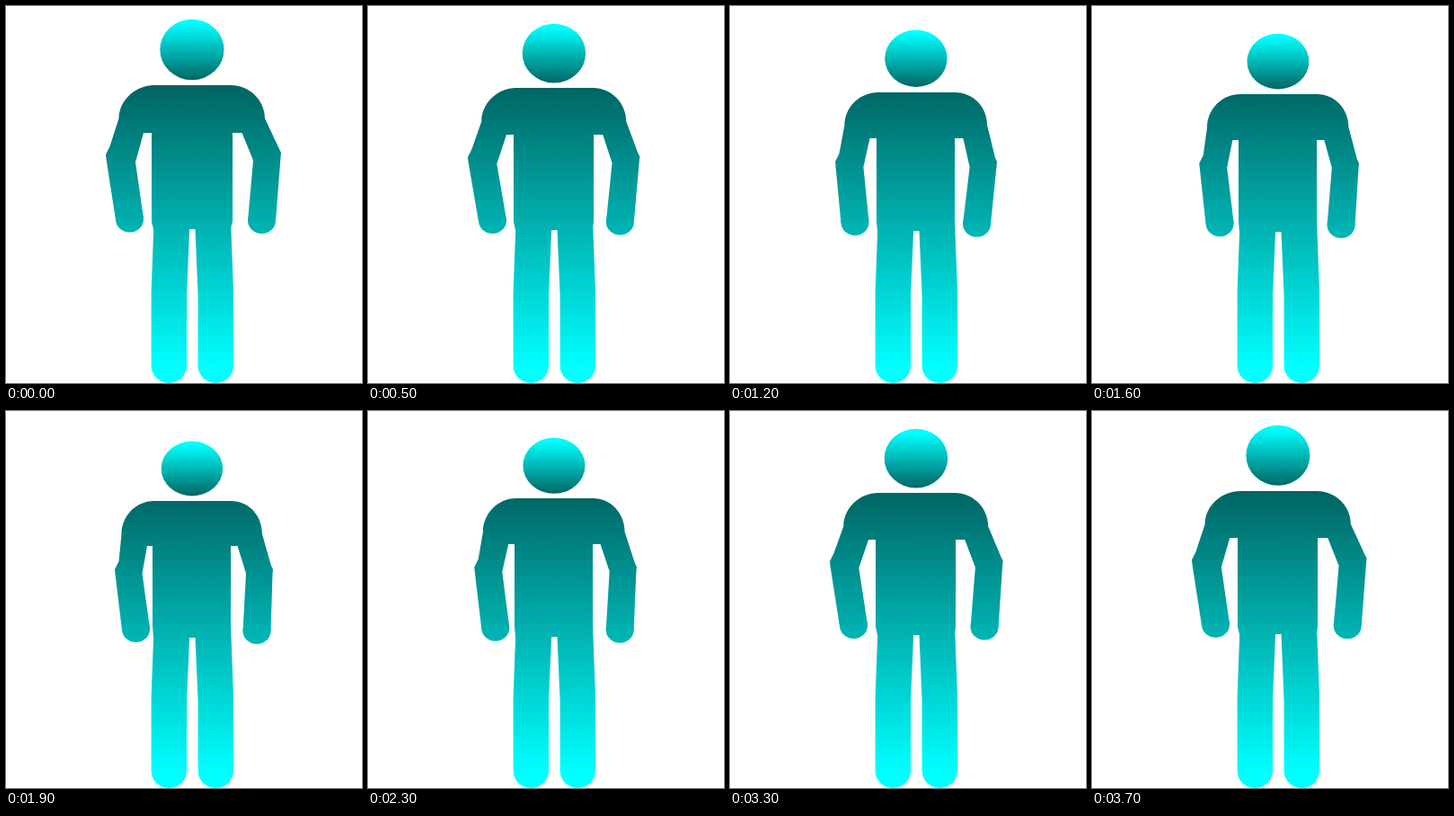
An HTML page with a canvas that plays this animation: 396 by 419 pixels, repeating every 3.8 s.

```html
<!DOCTYPE html>
<html lang="en">
<head>
<meta charset="utf-8">
<title>Breathing figure</title>
<style>
  html, body { margin: 0; width: 100%; height: 100%; overflow: hidden; background: #fff; }
  canvas { display: block; }
</style>
</head>
<body>
<canvas id="stage" width="396" height="419"></canvas>
<script>
const ctx = document.getElementById('stage').getContext('2d');
const STEP = 100, COUNT = 38, HALF = COUNT / 2;
const DARK = 'rgb(0,102,100)', CYAN = 'rgb(0,255,255)';

// Rows: step, elbow x, elbow y, hand x
const LEFT = [
  [0, 111, 165, 137.5], [5, 111, 168, 138.5], [12, 117, 173, 139],
  [19, 121, 176, 144.5], [27, 115.5, 171, 139], [33, 111, 167, 137.5], [38, 111, 165, 137.5]
];
const RIGHT = [
  [0, 306, 163, 284.5], [12, 297, 173, 274.5], [19, 297, 176, 279], [38, 306, 163, 284.5]
];

const mix = (a, b, k) => a + (b - a) * k;
const snap = (a, b, k) => Math.round(mix(a, b, k));

function pose(keys, n) {
  const i = keys.findIndex(k => k[0] > n);
  const a = keys[i - 1], b = keys[i];
  const k = (n - a[0]) / (b[0] - a[0]);
  return a.slice(1).map((v, j) => mix(v, b[j + 1], k));
}

function ramp(top, bottom, from, to) {
  const g = ctx.createLinearGradient(0, top, 0, bottom);
  g.addColorStop(0, from);
  g.addColorStop(1, to);
  return g;
}

function poly(points) {
  ctx.beginPath();
  points.forEach(p => ctx.lineTo(p[0], p[1]));
  ctx.fill();
}

function head(u) {
  const y = mix(48.5, 64, u), ry = mix(33.7, 30.4, u);
  ctx.fillStyle = ramp(y - ry + 4, y + ry, CYAN, DARK);
  ctx.beginPath();
  ctx.ellipse(206.9, y, mix(35.6, 34.2, u), ry, 0, 0, Math.PI * 2);
  ctx.fill();
}

// Points shared by the torso and the arms
function joints(u) {
  return {
    top: snap(88, 100, u), low: mix(125, 137, u), pit: snap(141, 150, u),
    l: mix(125.5, 128.5, u), r: mix(288, 285, u),
    pitL: mix(153, 157, u), pitR: mix(262.5, 257.5, u)
  };
}

function torso(u, { top, low, pit, l, r, pitL, pitR }) {
  const tl = snap(162, 163, u), tr = snap(251.6, 249.6, u), crotch = snap(248, 251.5, u);
  ctx.beginPath();
  ctx.moveTo(165, top);
  ctx.lineTo(250, top);
  ctx.bezierCurveTo(271, top, r, low - 20, r, low);
  ctx.lineTo(pitR, pit);
  ctx.lineTo(tr, pit);
  ctx.lineTo(tr, 240);
  ctx.lineTo(249.5, crotch);
  ctx.lineTo(164, crotch);
  ctx.lineTo(tl, 240);
  ctx.lineTo(tl, pit);
  ctx.lineTo(pitL, pit);
  ctx.lineTo(l, low);
  ctx.bezierCurveTo(l, low - 20, 144, top, 165, top);
  ctx.fill();
}

function arm(side, u, [ex, ey, hx], shoulder, pit, hy) {
  const ix = ex - side * mix(33, 30.5, u) + (side > 0 ? 2 - 1.5 * u : 0);
  const iy = ey + mix(8.5, 4.5, u);
  const knob = side < 0 ? [ex + 4.5, ey - 9] : [ex - 2, ey - 4];
  const tilt = side < 0 ? 1 : 0;
  poly([
    shoulder, knob, [ex, ey], [ex - side * 0.5, ey + 5],
    [hx + side * 15.5, hy + tilt], [hx - side * 15.5, hy - tilt],
    [ix, iy], pit, [207, pit[1]], [207, shoulder[1]]
  ]);
  ctx.beginPath();
  ctx.ellipse(hx, hy, 15.5, 14.5, 0, 0, Math.PI * 2);
  ctx.fill();
}

function leg(side, u) {
  const x = v => 207.3 + side * v;
  ctx.beginPath();
  ctx.moveTo(x(3.2), snap(248, 251.5, u));
  ctx.lineTo(x(6.3), 322);
  ctx.lineTo(x(6.3), 400);
  ctx.ellipse(x(26), 400, 19.7, 19, 0, side > 0 ? Math.PI : 0, side > 0 ? 0 : Math.PI, side > 0);
  ctx.lineTo(x(45.7), 318);
  ctx.lineTo(x(42.7), 238);
  ctx.lineTo(x(3.2), 238);
  ctx.fill();
}

function draw(n) {
  const u = 1 - Math.abs(n - HALF) / HALF, j = joints(u);
  ctx.fillStyle = '#fff';
  ctx.fillRect(0, 0, 396, 419);
  head(u);
  ctx.fillStyle = ramp(92, 402, DARK, CYAN);
  leg(-1, u);
  leg(1, u);
  torso(u, j);
  arm(-1, u, pose(LEFT, n), [j.l, j.low], [j.pitL, j.pit], mix(237, 242.5, u));
  arm(1, u, pose(RIGHT, n), [j.r, j.low], [j.pitR, j.pit], mix(238.5, 244.5, u));
}

const start = performance.now();
function tick() {
  draw(Math.floor((performance.now() - start) / STEP) % COUNT);
  requestAnimationFrame(tick);
}
tick();
</script>
</body>
</html>
```
